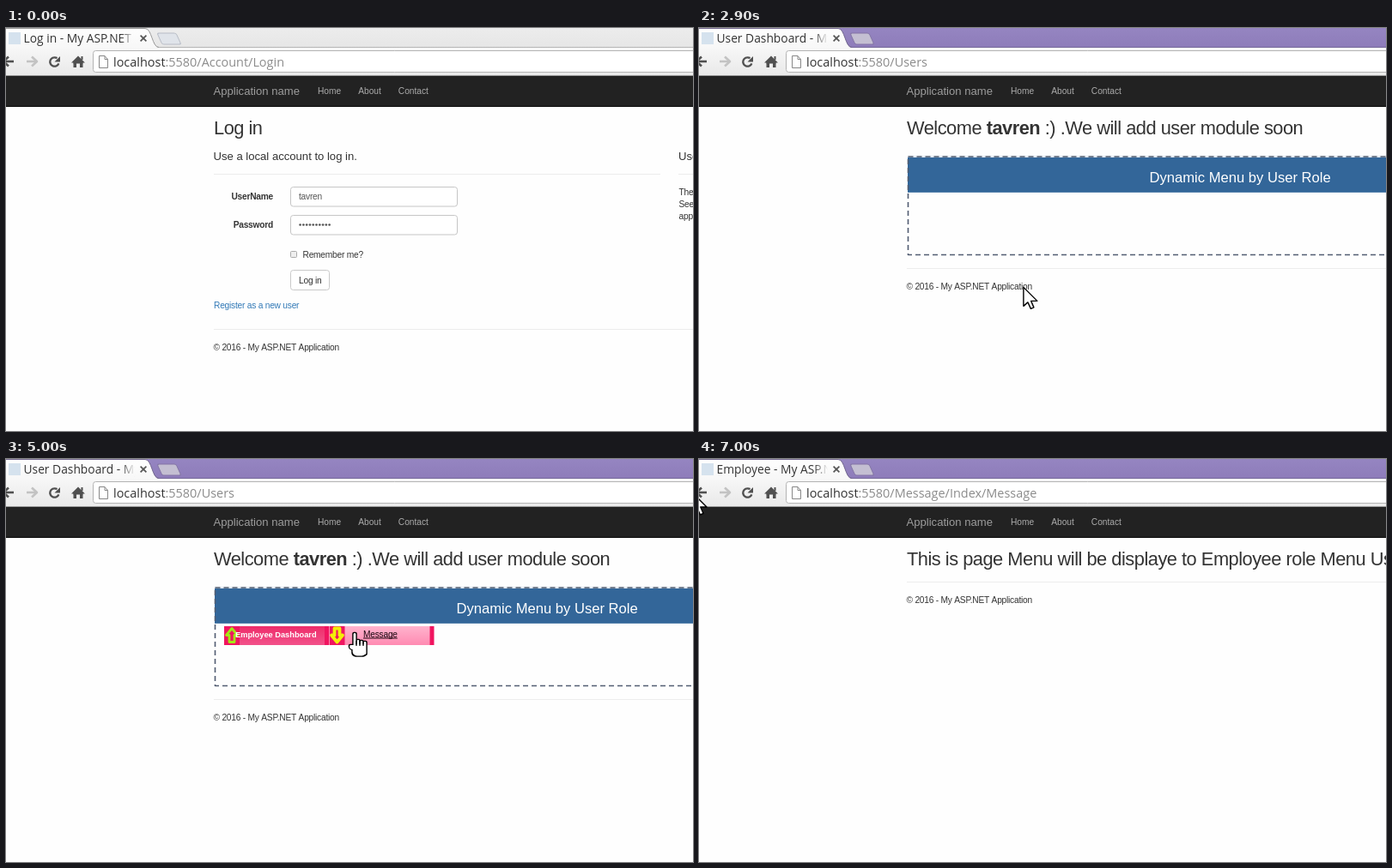
An HTML page with a canvas that plays this animation: 800 by 470 pixels, repeating every 7100 ms.

```html
<!DOCTYPE html>
<html lang="en">
<head>
<meta charset="utf-8">
<title>Log in demo</title>
<style>
html, body { margin: 0; width: 100%; height: 100%; overflow: hidden; background: #fefefe; }
canvas { display: block; width: 800px; height: 470px; }
</style>
</head>
<body>
<canvas id="stage" width="800" height="470"></canvas>
<script>
const c = document.getElementById('stage').getContext('2d');
const LOOP = 7100, STEP = 100;
const W = 800, H = 470, LEFT = 242;
const SANS = '"Liberation Sans", Arial, sans-serif';
const UI = '"Open Sans", "Noto Sans", sans-serif';
const BODY = 10.2, LEAD = 13.1, TITLE = 21.8, TIGHT = -0.022;
const INK = '#333', ICON = '#505050', RULE = '#ececec', PINK = '#f01560';
const USER = 'tavren';

// Times of the hard changes
const T = { hover: 700, click: 1200, wait: 1400, users: 2700, beam: 3000, menu: 3800, open: 4300, over: 4800, leave: 5700, message: 6000, away: 6500 };

// Pointer moves, each from where the last one ended
const FROM = { x: 455, y: 440 };
const MOVES = [
  { at: 100, ms: 600, x: 381, y: 292 },
  { at: 1000, ms: 200, x: 369, y: 292 },
  { at: 2700, ms: 300, x: 381, y: 306 },
  { at: 3800, ms: 500, x: 320, y: 206 },
  { at: 4600, ms: 400, x: 407, y: 203 },
  { at: 5700, ms: 200, x: 427, y: 204 },
  { at: 6400, ms: 600, x: -7, y: 40 }
];

function rect(x, y, w, h, fill) {
  c.fillStyle = fill;
  c.fillRect(x, y, w, h);
}

function paint(fill, stroke, width = 1) {
  c.lineJoin = 'round';
  if (fill) { c.fillStyle = fill; c.fill(); }
  if (stroke) { c.strokeStyle = stroke; c.lineWidth = width; c.stroke(); }
}

function box(x, y, w, h, r, fill, stroke, width) {
  c.beginPath();
  c.roundRect(x, y, w, h, r);
  paint(fill, stroke, width);
}

function trace(points) {
  c.beginPath();
  for (const [x, y] of points) c.lineTo(x, y);
}

function poly(points, fill, stroke, width) {
  trace(points);
  c.closePath();
  paint(fill, stroke, width);
}

function line(points, stroke, width) {
  trace(points);
  paint(null, stroke, width);
}

function arc(x, y, r, a, b, stroke, width) {
  c.beginPath();
  c.arc(x, y, r, a, b);
  paint(null, stroke, width);
}

function at(x, y, draw) {
  c.save();
  c.translate(x, y);
  draw();
  c.restore();
}

function grad(y0, y1, a, b) {
  const g = c.createLinearGradient(0, y0, 0, y1);
  g.addColorStop(0, a);
  g.addColorStop(1, b);
  return g;
}

function text(str, x, y, { size = BODY, color = INK, bold = false, align = 'left', font = SANS, track = 0 } = {}) {
  c.font = `${bold ? 'bold ' : ''}${size}px ${font}`;
  c.letterSpacing = `${track * size}px`;
  c.textAlign = align;
  c.fillStyle = color;
  c.fillText(str, x, y);
  return x + c.measureText(str).width;
}

const body = (str, x, y, style) => text(str, x, y, { track: TIGHT, ...style });
const heading = (str, x = LEFT, bold = false) => text(str, x, 124, { size: TITLE, track: TIGHT, bold });
const rule = (x, y, w) => rect(x, y, w, 1, RULE);

function footer(y) {
  rule(LEFT, y, W - LEFT);
  body('© 2016 - My ASP.NET Application', LEFT - .5, y + 24.5);
}

function navArrow(x, dir, color) {
  at(x, 39, () => {
    c.scale(dir, 1);
    line([[-6, 0], [6, 0]], color, 2.6);
    line([[0, -5.5], [6, 0], [0, 5.5]], color, 2.6);
  });
}

function reload() {
  arc(56.5, 39.5, 5.2, .35, 5.3, ICON, 2.3);
  poly([[63, 33], [63, 39.5], [56.5, 39.5]], ICON);
}

function cross(x, y, r, color, width) {
  for (const s of [-1, 1]) line([[x - r, y - r * s], [x + r, y + r * s]], color, width);
}

function home() {
  poly([[76, 40.5], [84, 32.5], [92, 40.5]], ICON);
  for (const x of [78.5, 86]) rect(x, 40, 3.5, 6, ICON);
  rect(78.5, 40, 11, 1.5, ICON);
  rect(87.5, 33, 2, 4, ICON);
}

function spinner(t) {
  const a = 2 - (t - 2100) / 200;
  arc(10, 12, 6.3, a - 1.3, a + 1.3, '#918da3', 1.7);
}

function tabs(t, title, loading) {
  const purple = t >= T.click;
  rect(0, 0, W, 23, purple ? grad(0, 23, '#9585c1', '#8e7cba') : grad(0, 23, '#ececec', '#e6e6e6'));
  rect(0, 22, W, 1, purple ? '#75689a' : '#b5b5b5');
  rect(0, 23, W, 32, grad(23, 55, '#f7f7f7', '#e9e9e9'));
  rect(0, 55, W, 1, '#999');

  c.beginPath();
  c.moveTo(-2, .5);
  c.lineTo(162, .5);
  c.bezierCurveTo(170, .5, 170, 23, 178, 23);
  c.lineTo(-2, 23);
  paint(grad(0, 24, '#fefefe', '#f7f7f7'));
  c.beginPath();
  c.moveTo(-2, .5);
  c.lineTo(162, .5);
  c.bezierCurveTo(170, .5, 170, 22.5, 178, 22.5);
  paint(null, purple ? '#74698f' : '#999');

  at(176, 6, () => {
    c.transform(1, 0, .45, 1, 0, 0);
    box(0, 0, 22, 13, 2, purple ? '#c4bfd2' : '#e0e4ea', purple ? '#8375a5' : '#b7bcc6');
  });

  if (loading) spinner(t);
  else rect(3, 5, 14, 14, '#d5e2ee');
  const fade = c.createLinearGradient(134, 0, 150, 0);
  fade.addColorStop(0, INK);
  fade.addColorStop(1, '#3330');
  text(title, 20.5, 17, { size: 13.8, color: fade, font: UI });
  cross(160, 12, 3.4, '#555', 1.7);
}

function toolbar(path, loading) {
  navArrow(3, -1, ICON);
  navArrow(30, 1, '#c3c3c3');
  if (loading) cross(56.5, 39.5, 4.8, ICON, 2.6);
  else reload();
  home();
  box(101.5, 26.5, W, 25, 3, '#fff', '#b3b3b3');
  poly([[108.5, 32.5], [115, 32.5], [118.5, 36.5], [118.5, 46.5], [108.5, 46.5]], '#fff', '#888');
  line([[115, 32.5], [115, 36.5], [118.5, 36.5]], '#888');
  const url = { size: 14.45, font: UI };
  const x = text('localhost', 125, 45, url);
  text(':5580' + path, x, 45, { ...url, color: '#8b8b8b' });
}

function navbar() {
  rect(0, 56, W, 36, '#222');
  rect(0, 91, W, 1, '#0a0a0a');
  text('Application name', LEFT - .5, 77.5, { size: LEAD, color: '#9d9d9d' });
  let x = 363;
  for (const link of ['Home', 'About', 'Contact']) x = text(link, x, 77, { color: '#acacac' }) + 20;
}

function field(label, y, draw) {
  body(label, 311, y + 14.5, { bold: true, align: 'right' });
  box(331.5, y, 194, 22.5, 3, '#fff', '#c6c6c6');
  draw(341, y + 14.5);
}

function dots(x, y) {
  c.fillStyle = '#555';
  for (let i = 0; i < 10; i++) {
    c.beginPath();
    c.arc(x + 1.6 + i * 3.78, y - 3.5, 1.35, 0, 7);
    c.fill();
  }
}

function loginPage(t) {
  heading('Log in');
  text('Use a local account to log in.', LEFT - .5, 154, { size: LEAD });
  text('Use another', 783, 154, { size: LEAD });
  rule(LEFT, 170, 520);
  rule(783, 170, 17);
  ['There are', 'See this', 'app'].forEach((s, i) => body(s, 783.5, 195 + i * 14));

  field('UserName', 185.5, (x, y) => body(USER, x, y, { color: '#555' }));
  field('Password', 218.5, dots);
  box(331.5, 260.5, 7, 7, 1, '#eee', '#aaa');
  body('Remember me?', 345.5, 267.5);

  const hover = t >= T.hover;
  box(331.5, 282.5, 45, 23, 3, hover ? '#e6e6e6' : '#fff', hover ? '#adadad' : '#c9c9c9');
  if (t >= T.click) box(331.5, 282.5, 45.5, 23.5, 2, null, '#7ba0d6', 2);
  body('Log in', 341, 297.5);
  body('Register as a new user', LEFT, 326.5, { color: '#337ab7' });
  footer(351);
}

function menuArrow(x, up) {
  const half = [[3, -8], [3, 0], [6.5, 0], [0, 8]];
  const mirror = half.map(([a, b]) => [-a, b]).reverse();
  at(x, 205.5, () => {
    c.scale(1, up ? -1 : 1);
    poly([...half, ...mirror], null, up ? '#a5e615' : '#f4ee08', up ? 2.8 : 3.8);
  });
}

function menuItem(x, top, bottom, up) {
  rect(x, 195, 122, 22, PINK);
  rect(x + 18, 195, 99, 22, grad(195, 217, top, bottom));
  menuArrow(x + 9, up);
}

function menu(t) {
  const open = t >= T.open, over = t >= T.over;
  const plain = ['#ee2c69', '#f2528a'];
  menuItem(254, ...plain, open);
  text('Employee Dashboard', 267, 207.5, { size: 9.25, color: '#fff', bold: true });
  if (!open) return;
  menuItem(376.5, ...(over ? ['#ffb3cd', '#ff8bb2'] : plain), false);
  const color = over ? '#1c0810' : '#fff';
  const end = body('Message', 416, 207.5, { color });
  if (over) rect(416, 208.5, end - 416, 1, color);
}

function usersPage(t) {
  const x = heading(USER, heading('Welcome '), true);
  heading(' :) .We will add user module soon', x);

  rect(243, 149, W, 2, '#e3eaf1');
  rect(243, 151, W, 41, '#336699');
  rect(243, 191, W, 1, '#5582ac');
  c.setLineDash([6, 4]);
  c.strokeStyle = '#525d72';
  c.lineWidth = 1.6;
  c.strokeRect(243.5, 150, W, 114.5);
  c.setLineDash([]);
  text('Dynamic Menu by User Role', 524.5, 179.5, { size: 16.6, color: '#fff' });

  if (t >= T.menu) menu(t);
  footer(280);
}

function messagePage() {
  heading('This is page Menu will be displaye to Employee role Menu User');
  footer(143);
}

function hand() {
  const shapes = pad => {
    c.beginPath();
    for (let i = 0; i < 4; i++) {
      const y = i ? 6.5 + i : -.5;
      c.roundRect(-2 + i * 4 - pad, y - pad, 4 + pad * 2, 16 + pad * 2, 2);
    }
    c.roundRect(-3 - pad, 13 - pad, 17 + pad * 2, 14 + pad * 2, [2, 2, 5, 5]);
    c.roundRect(-6.5 - pad, 13.5 - pad, 6 + pad * 2, 6 + pad * 2, [2, 2, 2, 5]);
  };
  at(-1, 0, () => {
    shapes(.8);
    paint('#000');
    shapes(-.6);
    paint('#fff');
    for (let i = 1; i < 4; i++) rect(-2.6 + i * 4, 9, 1.2, 6, '#000');
  });
}

function arrow() {
  poly([[0, 0], [0, 22], [5, 17.5], [8.5, 25], [12, 23.5], [8.8, 16], [16, 16]], '#fff', '#000', 1.4);
}

function beam() {
  rect(-.8, -7, 1.6, 14, INK);
  for (const y of [-7.5, 6.5]) rect(-3.5, y, 7, 1.4, INK);
}

function pointerShape(t) {
  if (t < T.hover || t >= T.away) return arrow;
  if (t < T.users || t >= T.open) return hand;
  return t >= T.beam && t < T.menu ? beam : arrow;
}

function pointer(t) {
  if (t < MOVES[0].at) return;
  let { x, y } = FROM;
  for (const m of MOVES) {
    const k = Math.min(1, Math.max(0, (t - m.at) / m.ms));
    const ease = k * k * (3 - 2 * k);
    x += (m.x - x) * ease;
    y += (m.y - y) * ease;
  }
  at(x, y, pointerShape(t));
}

function pageAt(t) {
  if (t < T.users) return { title: 'Log in - My ASP.NET', path: '/Account/Login', loading: t >= T.wait, draw: loginPage };
  if (t < T.message) return { title: 'User Dashboard - My ASP.NET', path: '/Users', loading: t >= T.leave, draw: usersPage };
  return { title: 'Employee - My ASP.NET', path: '/Message/Index/Message', loading: false, draw: messagePage };
}

function render(t) {
  const page = pageAt(t);
  rect(0, 0, W, H, '#fefefe');
  tabs(t, page.title, page.loading);
  toolbar(page.path, page.loading);
  navbar();
  page.draw(t);
  pointer(t);
}

const start = performance.now();
function tick() {
  const t = (performance.now() - start) % LOOP;
  render(Math.floor(t / STEP) * STEP);
  requestAnimationFrame(tick);
}
tick();
</script>
</body>
</html>
```
